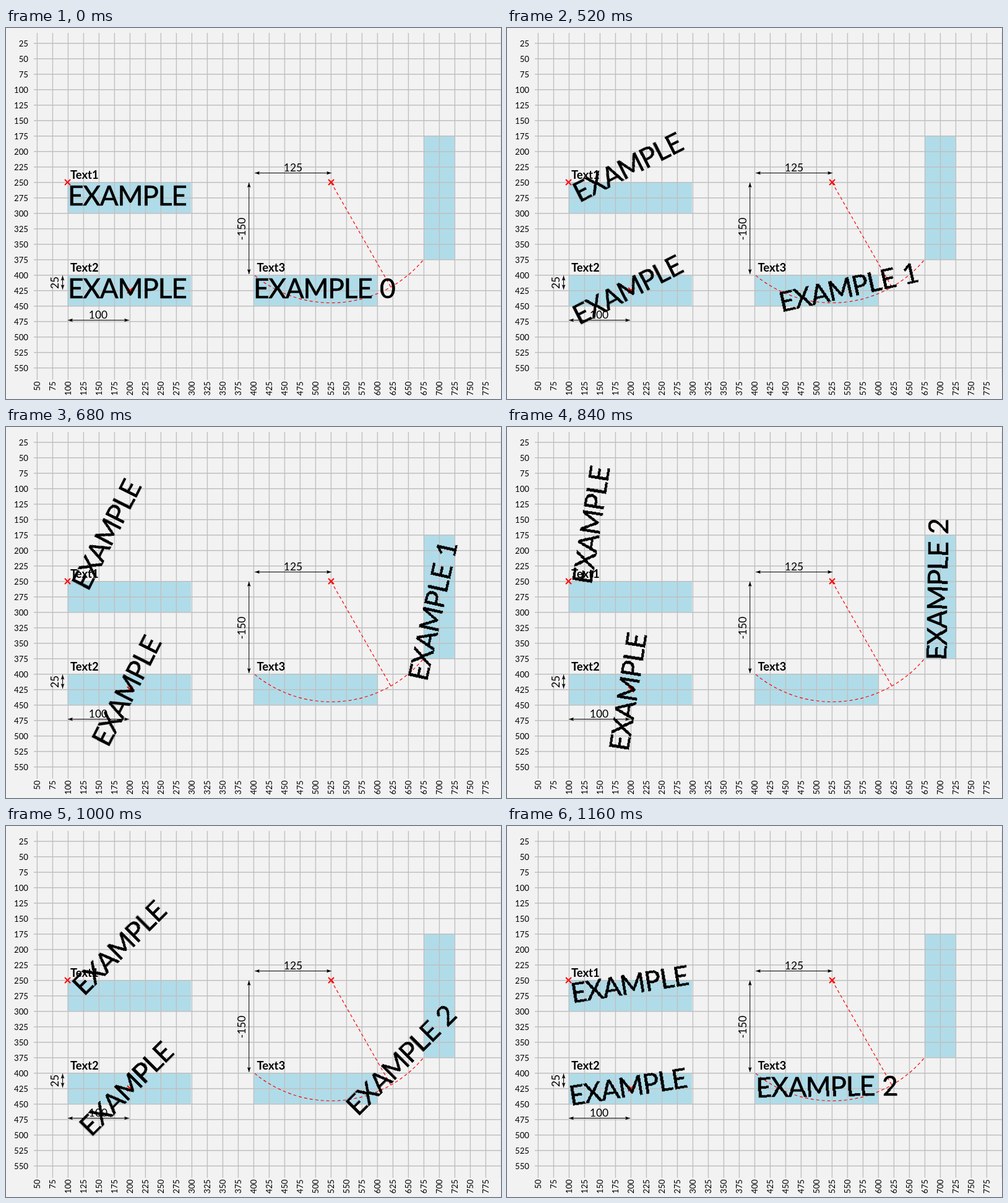
Recreate the animation shown at these times as an HTML page with a canvas. Size 800 by 600 pixels, loop 1.2 s.

```html
<!DOCTYPE html>
<html>
<head>
<meta charset="utf-8">
<style>
  html, body { margin: 0; width: 100%; height: 100%; overflow: hidden; background: #f2f2f2; }
  canvas { display: block; }
</style>
</head>
<body>
<canvas id="stage" width="800" height="600"></canvas>
<script>
const ctx = document.getElementById('stage').getContext('2d');
const LOOP = 1200, STEP = 40, HOLD = 400;
const BIG = '44.2px Lato, sans-serif';
const AXIS = '13.2px Lato, sans-serif';
const BOLD = 'bold 18.4px Lato, sans-serif';
const SIZE = '17.4px Lato, sans-serif';

function text(str, x, y, font, align = 'left', turned = false) {
  ctx.save();
  ctx.translate(x, y);
  if (turned) ctx.rotate(-Math.PI / 2);
  ctx.font = font;
  ctx.textAlign = align;
  ctx.fillStyle = '#000';
  ctx.fillText(str, 0, 0);
  ctx.restore();
}

function line(x1, y1, x2, y2) {
  ctx.beginPath();
  ctx.moveTo(x1, y1);
  ctx.lineTo(x2, y2);
  ctx.stroke();
}

function arrowHead(x, y, angle) {
  ctx.save();
  ctx.translate(x, y);
  ctx.rotate(angle);
  ctx.beginPath();
  ctx.moveTo(0, 0);
  ctx.lineTo(-8, -2.8);
  ctx.lineTo(-6.5, 0);
  ctx.lineTo(-8, 2.8);
  ctx.fill();
  ctx.restore();
}

function dimension(x1, y1, x2, y2) {
  const angle = Math.atan2(y2 - y1, x2 - x1);
  ctx.strokeStyle = ctx.fillStyle = '#000';
  ctx.lineWidth = 1;
  line(x1, y1, x2, y2);
  arrowHead(x2, y2, angle);
  arrowHead(x1, y1, angle + Math.PI);
}

function cross(x, y) {
  const r = 4.5;
  ctx.lineWidth = 2;
  line(x - r, y - r, x + r, y + r);
  line(x - r, y + r, x + r, y - r);
}

function drawBackground() {
  ctx.fillStyle = '#f2f2f2';
  ctx.fillRect(0, 0, 800, 600);
  ctx.fillStyle = '#b0dce9';
  ctx.fillRect(99.3, 249.5, 199.7, 50);
  ctx.fillRect(99.3, 399.5, 199.7, 50);
  ctx.fillRect(400.5, 399.5, 199.7, 50);
  ctx.fillRect(675, 174.5, 51, 200);

  ctx.strokeStyle = '#bfbfbf';
  ctx.lineWidth = 1.4;
  for (let x = 50; x <= 800; x += 25) {
    line(x + .4, 8, x + .4, 569);
    if (x < 800) text(x, x + 5, 571.5, AXIS, 'right', true);
  }
  for (let y = 25; y <= 550; y += 25) {
    line(45, y - .2, 800, y - .2);
    text(y, 36, y + 5, AXIS, 'right');
  }

  text('Text1', 104, 244, BOLD);
  text('Text2', 104, 394, BOLD);
  text('Text3', 405.5, 394, BOLD);
  text('125', 464, 232, SIZE, 'center');
  text('100', 149, 470, SIZE, 'center');
  text('25', 85, 412, SIZE, 'center', true);
  text('-150', 387, 325, SIZE, 'center', true);
  dimension(402, 234.5, 526, 234.5);
  dimension(392.7, 250, 392.7, 398);
  dimension(91.5, 400.5, 91.5, 423);
  dimension(100, 472.5, 199, 472.5);
}

function drawMarks() {
  ctx.strokeStyle = '#f00';
  ctx.lineWidth = 1.2;
  ctx.setLineDash([5, 4]);
  line(525.5, 250, 622, 419);
  ctx.beginPath();
  ctx.arc(525.5, 250, 194.5, Math.atan2(150, -123.5), Math.atan2(126, 149.5), true);
  ctx.stroke();
  ctx.setLineDash([]);
  cross(99.5, 249.5);
  cross(525.5, 249.5);
  cross(200.5, 424.5);
}

// The words are bitmaps, so turning them gives hard pixel edges.
function makeBitmap(digit) {
  const bitmap = document.createElement('canvas');
  bitmap.width = 240;
  bitmap.height = 50;
  const c = bitmap.getContext('2d');
  c.font = BIG;
  c.letterSpacing = '-1.2px';
  c.lineWidth = .6;
  for (const [str, x] of [['EXAMPLE', 0], [digit, 204]]) {
    c.fillText(str, x, 37);
    c.strokeText(str, x, 37);
  }
  return bitmap;
}
const plain = makeBitmap('');
const numbered = ['0', '1', '2'].map(makeBitmap);

function drawTurned(bitmap, x, y, pivotX, pivotY, degrees) {
  ctx.save();
  ctx.imageSmoothingEnabled = false;
  ctx.translate(pivotX, pivotY);
  ctx.rotate(-degrees * Math.PI / 180);
  ctx.drawImage(bitmap, x - pivotX, y - pivotY);
  ctx.restore();
}

const easeIn = t => Math.pow(2 * t, 2.5) / 2;
const easeInOut = t => t < .5 ? easeIn(t) : 1 - easeIn(1 - t);

function draw(now) {
  const time = now % LOOP;
  const step = Math.max(0, Math.floor((time - HOLD) / STEP));
  const progress = 1 - Math.abs(step - 10) / 10;
  const phase = step === 0 ? 0 : step <= 10 ? 1 : 2;

  drawBackground();
  drawMarks();
  drawTurned(plain, 100, 250, 100, 250, 90 * progress);
  drawTurned(plain, 100, 400, 200, 425, 90 * progress);
  drawTurned(numbered[phase], 400, 400, 525, 250, 90 * easeInOut(progress));
}

const start = performance.now();
function tick() {
  draw(performance.now() - start);
  requestAnimationFrame(tick);
}
tick();
</script>
</body>
</html>
```
